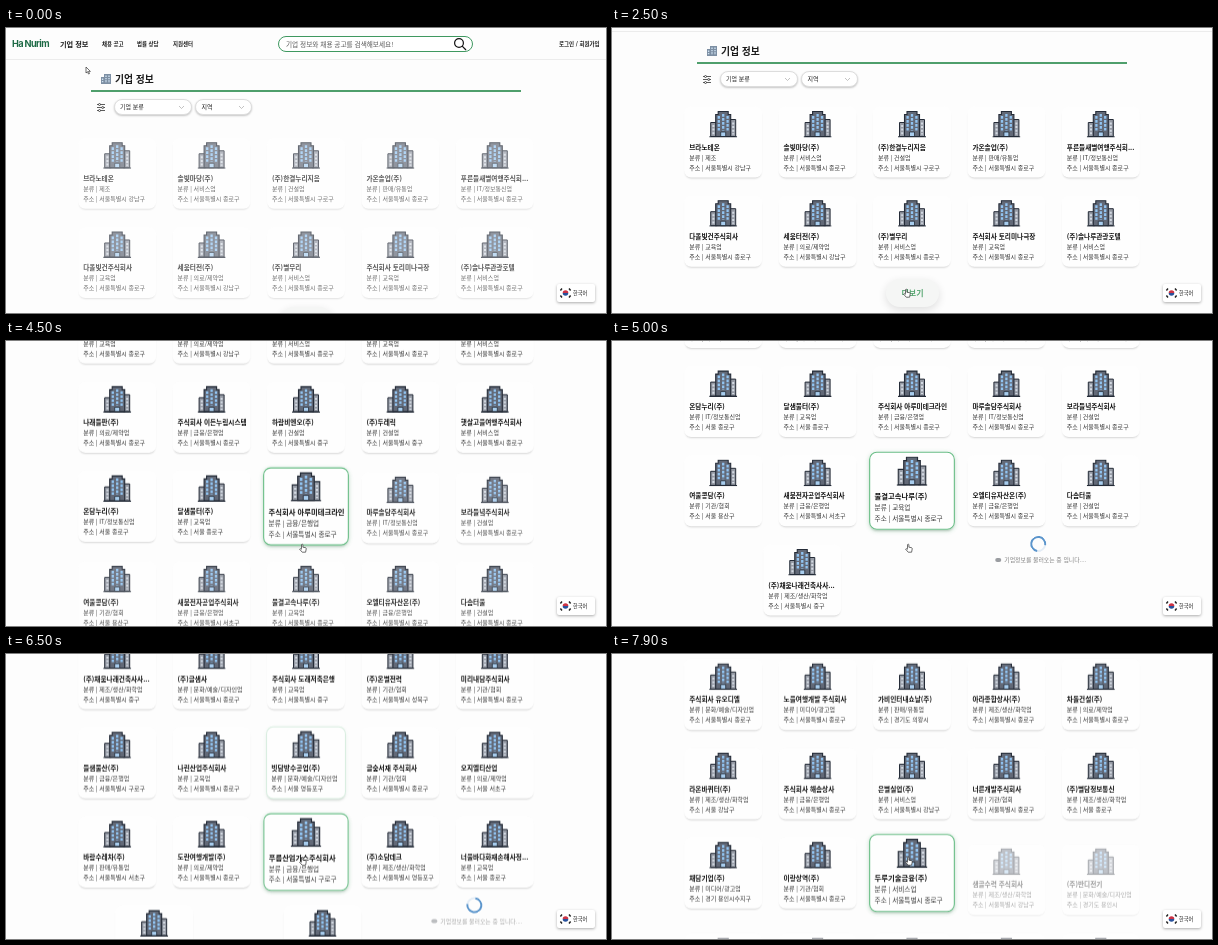
Animation of 600x285 px, one loop 8000 ms. Source, as an HTML page:

```html
<!DOCTYPE html>
<html lang="ko">
<head>
<meta charset="utf-8">
<title>기업 정보</title>
<style>
html, body { margin: 0; width: 100%; height: 100%; overflow: hidden; background: #fdfdfd; }
body { font-family: "Noto Sans CJK KR", "Noto Sans KR", "Noto Sans CJK", sans-serif; color: #1c1c1c; }
#stage { position: relative; width: 600px; height: 285px; overflow: hidden; background: #fdfdfd; }
#page { position: absolute; left: 0; top: 0; width: 600px; height: 1400px; will-change: transform; }
.t { position: absolute; white-space: nowrap; line-height: 12px; height: 12px; }
.b { font-weight: 700; }
svg { position: absolute; overflow: visible; }
#head { position: absolute; width: 600px; height: 31px; border-bottom: 1px solid #ececec; }
#search { position: absolute; left: 272px; top: 8px; width: 194px; height: 15px; box-sizing: border-box;
  border: 1px solid #3f9860; border-radius: 8px; width: 195px; height: 16px; background: #fff; }
#rule { position: absolute; left: 85px; top: 62.4px; width: 430px; height: 1.3px; background: #4f9f6c; }
.pill { position: absolute; top: 71px; height: 16px; box-sizing: border-box; border: .6px solid #ddd;
  border-radius: 8px; background: #fff; box-shadow: 0 1px 2px rgba(0,0,0,.22); }
.card { position: absolute; left: 0; top: 0; width: 78px; height: 71px; border-radius: 7px; background: #fefefe; }
.card::before, .card::after { content: ""; position: absolute; inset: 0; border-radius: inherit; }
.card::before { box-shadow: 0 2px 2px -1px rgba(0,0,0,.16); }
.card::after { border: 1.3px solid #69bd86; box-sizing: border-box; opacity: var(--h);
  box-shadow: 0 1px 4px rgba(60,150,90,.3); }
.card svg { left: 25px; top: 3.5px; }
.card .t { left: 5px; font-size: 6px; line-height: 10px; height: 10px; color: #333; }
.card .b { font-size: 6.65px; color: #111; }
#more { position: absolute; left: 274px; top: 279px; width: 53px; height: 28px; border-radius: 14px;
  background: #f5f6f5; box-shadow: 0 3px 9px rgba(0,0,0,.12); color: #58a772; font-size: 8px;
  line-height: 28px; text-align: center; }
#loader { position: absolute; left: 0; top: 0; }
#ring { position: absolute; left: -8px; top: -8px; width: 16px; height: 16px; box-sizing: border-box;
  border: 2px solid #5b95cc; border-top-color: #e4edf6; border-radius: 50%; }
#wait { left: -34px; top: 10px; font-size: 5.9px; }
#wait::before { content: ""; position: absolute; left: -9px; top: 4px; width: 6px; height: 4px;
  border-radius: 2px; background: #4b5057; }
#lang { position: absolute; left: 551px; top: 256px; width: 38px; height: 18px; border-radius: 2px;
  background: #fff; box-shadow: 0 1px 3px rgba(0,0,0,.32); }
</style>
</head>
<body>
<div id="stage">
  <svg width="0" height="0">
    <symbol id="tower" viewBox="0 0 28 27">
      <path d="M1.5 12H8V26H1.5ZM20 9H26.5V26H20Z" fill="#969ba5" stroke="#252c38"/>
      <path d="M6.5 4H9V1H19V4H21.5V26H6.5Z" fill="#626977" stroke="#252c38" stroke-width="1.1"/>
      <path d="M9.6 5.5V20M14 3.5V20M18.4 5.5V20" stroke="#91c4f2" stroke-width="2.3" stroke-dasharray="2.7 1.3"/>
      <path d="M4.2 14.5V24M24 12V24" stroke="#d3dae3" stroke-width="2" stroke-dasharray="2 1.6"/>
      <path d="M11.5 21.5H16.5V26H11.5Z" fill="#a8cdee" stroke="#252c38" stroke-width=".8"/>
      <path d="M0 26.3H28" stroke="#252c38" stroke-width="1.2"/>
    </symbol>
  </svg>
  <div id="page">
    <div id="head">
      <div class="t b" style="left:6px;top:10px;font:700 9.2px/12px Inter,sans-serif;letter-spacing:-.6px;color:#1d6a45">Ha Nurim</div>
      <div class="t b" style="left:54px;top:10px;font-size:7.2px">기업 정보</div>
      <div class="t b" style="left:96px;top:10px;font-size:5.45px">채용 공고</div>
      <div class="t b" style="left:131px;top:10px;font-size:5.45px">법률 상담</div>
      <div class="t b" style="left:167px;top:10px;font-size:5.45px">지원센터</div>
      <div id="search"></div>
      <div class="t" style="left:280px;top:10px;font-size:6.65px;color:#555">기업 정보와 채용 공고를 검색해보세요!</div>
      <svg style="left:448px;top:10px" width="13" height="13" fill="none" stroke="#111" stroke-width="1.2"><circle cx="5" cy="5" r="4.4"/><path d="M8.2 8.2L12 12"/></svg>
      <div class="t b" style="left:553px;top:10px;font-size:5.5px">로그인 / 회원가입</div>
    </div>
    <svg style="left:95px;top:46px" width="10" height="10"><path d="M0 3H3V0H10V10H0Z" fill="#7d8fa3"/><path d="M5 1.5V9M8 1.5V9M1.6 4.5V9" stroke="#cfe2f2" stroke-width="1.4" stroke-dasharray="1.4 1"/></svg>
    <div class="t b" style="left:109px;top:45px;font-size:9.8px">기업 정보</div>
    <div id="rule"></div>
    <svg style="left:91px;top:75px" width="8" height="9" fill="#fdfdfd" stroke="#333" stroke-width=".8"><path d="M0 1.5H8M0 4.5H8M0 7.5H8"/><circle cx="2.5" cy="1.5" r="1"/><circle cx="5.7" cy="4.5" r="1"/><circle cx="2.5" cy="7.5" r="1"/></svg>
    <div class="pill" style="left:108px;width:78px"></div>
    <div class="pill" style="left:189px;width:57px"></div>
    <div class="t" style="left:114px;top:73px;font-size:6px">기업 분류</div>
    <div class="t" style="left:195.5px;top:73px;font-size:6px">지역</div>
    <svg style="left:173px;top:78px" width="70" height="4" fill="none" stroke="#aaa" stroke-width=".7"><path d="M0 0L2.5 2.5L5 0M60 0L62.5 2.5L65 0"/></svg>
    <div id="cards"></div>
    <div id="more" class="b">더보기</div>
    <div id="loader"><div id="ring"></div><div id="wait" class="t">기업정보를 불러오는 중 입니다....</div></div>
  </div>
  <div id="lang">
    <svg style="left:2.5px;top:4px" width="11" height="10"><path d="M2.7 5A2.8 2.8 0 0 1 8.3 5Z" fill="#cd3345"/><path d="M2.7 5A2.8 2.8 0 0 0 8.3 5Z" fill="#28529c"/><path d="M.4 2.4L2 .6M9 .6L10.6 2.4M.4 7.6L2 9.4M9 9.4L10.6 7.6" stroke="#222" stroke-width="1.5"/></svg>
    <div class="t" style="left:16px;top:3px;font-size:5.2px">한국어</div>
  </div>
  <svg id="cursor" width="8" height="10" stroke="#333" stroke-width=".7" fill="#fff">
    <path id="arrow" d="M0 0V6L1.5 4.7L2.5 7L3.5 6.6L2.5 4.4H4.4Z"/>
    <path id="hand" d="M1.5 4.5V.6Q2.2-.3 2.9.6V3.2L5.6 3.7Q6.4 4 6.2 5L5.6 8.2H2.2L-.4 5.2Q0 4.2 1.5 5.2Z"/>
  </svg>
</div>
<script>
const LOOP = 8000, PITCH = 89.2, LEFT = 64, WIDTH = 472, FADE = 500;
const KINDS = ["제조", "서비스업", "건설업", "판매/유통업", "IT/정보통신업", "교육업", "의료/제약업",
  "금융/은행업", "기관/협회", "제조/생산/화학업", "문화/예술/디자인업", "미디어/광고업"];

// name, kind, district (default 종로구)
const FIRMS = `브라노테온,0,강남구;솔빛마당(주),1;(주)한결누리지음,2,구로구;가온솔업(주),3;푸른들새별여행주식회...,4
다올빛건주식회사,5;세움터전(주),6,강남구;(주)별무리,1;주식회사 토리미나극장,5;(주)솔나루관광호텔,1
나래들판(주),6;주식회사 이든누림시스템,7;하람비엔오(주),2,중구;(주)두레릭,2,중구;햇살고을여행주식회사,1
온담누리(주),4,서울 종로구;달샘물터(주),5,서울 종로구;주식회사 아루미테크라인,7;마루솔담주식회사,4;보라들녘주식회사,2
여울콩담(주),8,서울 용산구;새붐전자공업주식회사,7,서초구;물결고속나루(주),5;오엘티유자산온(주),7;다솜터울,2
(주)채움나래건축사사...,9,중구;(주)글샘사,10;주식회사 도래저축은행,5,중구;(주)온별전력,8,성북구;미리내담주식회사,8
들샘물산(주),7,구로구;나린산업주식회사,5;빗담방수공업(주),10,서울 영등포구;글숲서재 주식회사,8;오지엘티산업,6,서울 서초구
바람수레차(주),3,서초구;도란여행개발(주),6;푸름산업가스주식회사,7,구로구;(주)소담데크,9,영등포구;너울바다화재손해사정...,5,서울 종로구
고운누비(주),1;해든마루(주),2;(주)새밭,5;늘봄들주식회사,8;꽃내음터(주),3
주식회사 유오디엘,10;노을여행개발 주식회사,11;가비인터내쇼날(주),3,경기도 의왕시;아라종합상사(주),9;차돌건설(주),6
라온바퀴터(주),9,서울 강남구;주식회사 해솜상사,7;은별실업(주),1,강남구;너른개발주식회사,8;(주)별담정보통신,9,서울 종로구
채담기업(주),11,경기 용인시수지구;이랑상역(주),8;두루기술금융(주),1;샘골수력 주식회사,9,강남구;(주)반디전기,10,경기도 용인시`
  .split(/[;\n]/).map(s => s.split(","));

// [time, card count]
const LOADS = [[-350, 10], [2850, 18], [4060, 26], [5425, 34], [6000, 42], [6600, 50], [7150, 58], [7700, 66]];
// [time, scroll offset]
const SCROLL = [[0, 0], [850, 0], [1400, 28], [2950, 28], [3550, 171], [4100, 171], [4500, 244], [4950, 349],
  [5425, 349], [5600, 409], [5700, 438], [6050, 438], [6500, 568], [6620, 616], [6700, 616], [6950, 706],
  [7200, 706], [7450, 884], [7720, 884], [7900, 904], [8000, 930]];
// [time, x, y]
const POINTER = [[0, 80, 39], [1300, 80, 39], [2200, 292, 261], [3000, 292, 261], [3500, 294, 203], [8000, 294, 203]];
// [time, hovered card]
const HOVERS = [[3200, 12], [4120, 17], [4600, 22], [5425, 27], [5720, 32], [6350, 37], [6620, 42],
  [6950, 47], [7320, 52], [7450, 57], [9000, -1]];

const $ = id => document.getElementById(id);
const clamp = v => Math.max(0, Math.min(1, v));

function track(keys, t) {
  let i = 1;
  while (i < keys.length - 1 && keys[i][0] < t) i++;
  const a = keys[i - 1], b = keys[i], p = clamp((t - a[0]) / (b[0] - a[0]));
  return a.slice(1).map((v, k) => v + (b[k + 1] - v) * p);
}

function makeCard(i) {
  const [name, kind, place = "종로구"] = FIRMS[i % FIRMS.length];
  const address = place.includes(" ") ? place : "서울특별시 " + place;
  const el = document.createElement("div");
  el.className = "card";
  el.innerHTML = `<svg width="28" height="27"><use href="#tower"/></svg>
    <div class="t b" style="top:34.5px">${name}</div>
    <div class="t" style="top:45.5px">분류 | ${KINDS[kind]}</div>
    <div class="t" style="top:56px">주소 | ${address}</div>`;
  $("cards").append(el);
  return { el, born: LOADS.find(l => l[1] > i)[0] };
}
const cards = Array.from({ length: 66 }, (_, i) => makeCard(i));

function hoverAmount(i, t) {
  const k = HOVERS.findIndex(h => h[1] === i);
  if (k < 0) return 0;
  const rise = 1 - (1 - clamp((t - HOVERS[k][0]) / 200)) ** 2;
  return rise * (1 - clamp((t - HOVERS[k + 1][0]) / 200));
}

function render(t) {
  const [scroll] = track(SCROLL, t);
  $("page").style.transform = `translateY(${-scroll}px)`;

  const count = LOADS.filter(l => l[0] <= t).pop()[1];
  const waiting = t >= 2650;
  const lastRow = Math.floor(count / 5), rest = count % 5;
  const slot = (WIDTH + 33) / (rest + 1);

  cards.forEach(({ el, born }, i) => {
    const row = Math.floor(i / 5), y = 106.5 + PITCH * row;
    const shown = i < count && y - scroll > -90 && y - scroll < 300;
    el.style.display = shown ? "" : "none";
    if (!shown) return;
    const pitch = row === lastRow ? slot : WIDTH / 5;
    const x = LEFT + pitch * (i % 5 + .5) - 39;
    const p = clamp((t - born) / FADE), h = hoverAmount(i, t);
    el.style.opacity = p;
    el.style.zIndex = h > 0 ? 1 : 0;
    el.style.setProperty("--h", h);
    el.style.transform = `translate(${x}px,${y + 11 * (1 - p)}px) scale(${1 + .1 * h})`;
  });

  $("more").style.display = waiting ? "none" : "";
  $("loader").style.display = waiting ? "" : "none";
  const lx = LEFT + rest * slot + (slot - 33) / 2;
  $("loader").style.transform = `translate(${lx}px,${106 + PITCH * lastRow}px)`;
  $("ring").style.transform = `rotate(${(t - 5600) * .36}deg)`;
  $("wait").style.opacity = .68 + .32 * Math.cos((t - 3700) / 1900 * 2 * Math.PI);

  const [cx, cy] = track(POINTER, t), onButton = t > 2100;
  $("cursor").style.transform = `translate(${cx}px,${cy}px)`;
  $("arrow").style.display = onButton ? "none" : "";
  $("hand").style.display = onButton ? "" : "none";
}

const start = performance.now();
function tick() {
  render((performance.now() - start) % LOOP);
  requestAnimationFrame(tick);
}
tick();
</script>
</body>
</html>
```
